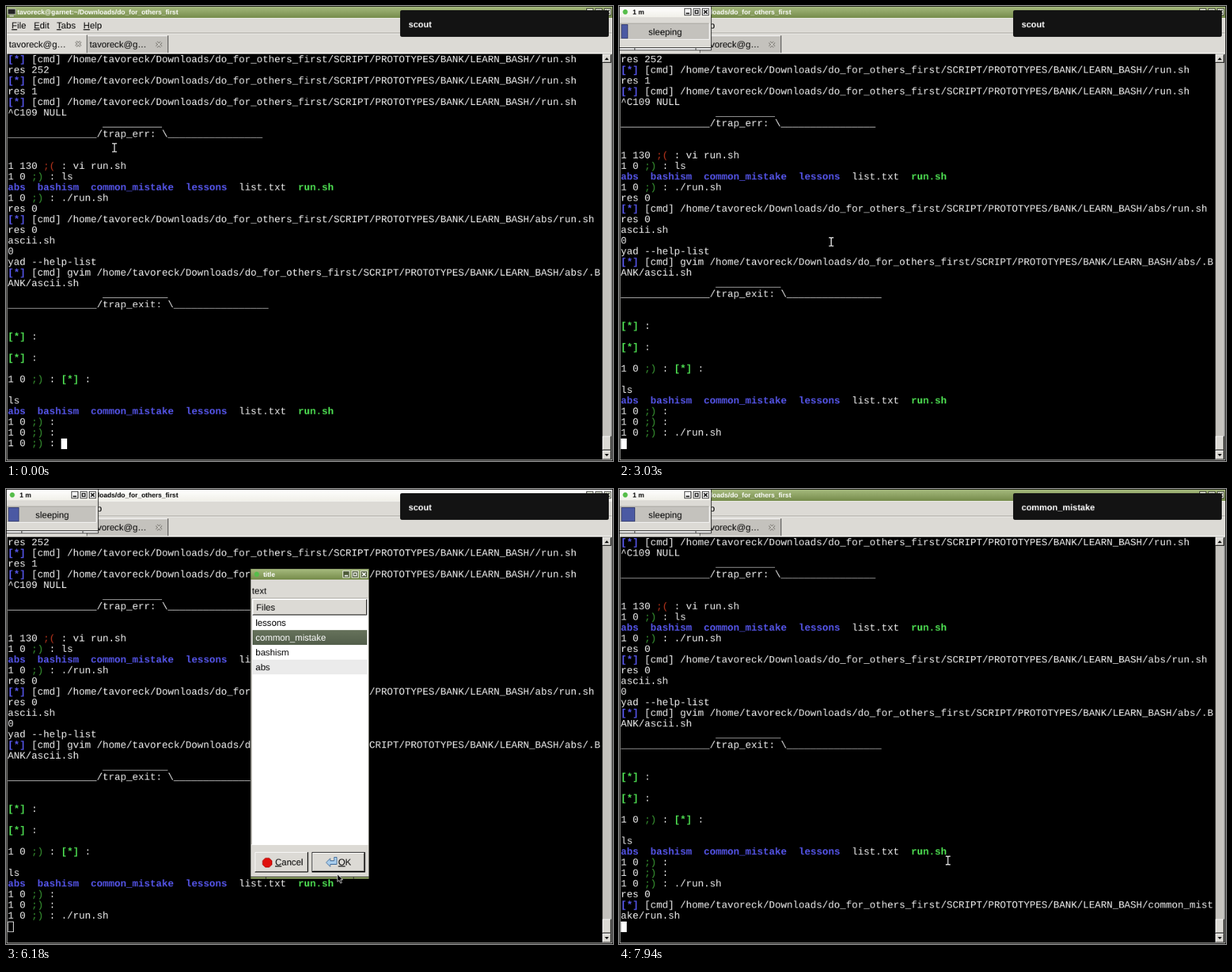
An HTML page for the animation above (8 s loop, 864 by 648 pixels).

```html
<!DOCTYPE html>
<html lang="en">
<head>
<meta charset="utf-8">
<title>Terminal session</title>
<style>
html, body { margin: 0; width: 100%; height: 100%; overflow: hidden; background: #000; }
/* A 1024 x 768 desktop, shown at 27/32 of its size */
svg { position: absolute; left: 0; top: 0; width: 1024px; height: 768px; transform: scale(.84375); transform-origin: 0 0; will-change: transform; }
text { font: 15.17px "Liberation Sans", Arial, sans-serif; fill: #000; white-space: pre; text-rendering: geometricPrecision; }
.cap { font-size: 11.25px; font-weight: bold; }
.note { font-size: 14.65px; font-weight: bold; fill: #fff; }
.term text { font: 16.665px "Liberation Mono", monospace; fill: #f4f4f4; }
.term .b { fill: #5656ec; font-weight: bold; }
.term .g { fill: #4ee052; font-weight: bold; }
.term .s { fill: #3a9c34; }
.term .r { fill: #b8341c; }
.u { text-decoration: underline; }
</style>
</head>
<body>
<svg id="stage" viewBox="0 0 1024 768">
  <defs>
    <linearGradient id="green" x2="0" y2="1"><stop stop-color="#a6ba7e"/><stop offset="1" stop-color="#758b4a"/></linearGradient>
    <linearGradient id="pale" x2="0" y2="1"><stop stop-color="#fff"/><stop offset="1" stop-color="#f1f0e9"/></linearGradient>
    <linearGradient id="sel" x2="0" y2="1"><stop stop-color="#66725b"/><stop offset="1" stop-color="#525e4a"/></linearGradient>
  </defs>
</svg>
<script>
const LOOP = 8000, SCALE = .84375, ROWS = 37, PITCH = 18, CELL = 10, LEFT = 3, TOP = 82;
const GREY = '#dcdad5', TROUGH = '#c4c2bd', SHADE = '#9c9a94', GREEN = 'url(#green)', PALE = 'url(#pale)';
const USER = 'tavoreck', HOST = 'garnet';
const stage = document.getElementById('stage');
const $ = id => document.getElementById(id);

const rect = (x, y, w, h, fill, more = '') =>
  `<rect x="${x}" y="${y}" width="${w}" height="${h}" fill="${fill}" ${more}/>`;
const box = (x, y, w, h, fill, line = '#000', more = '') =>
  rect(x + .5, y + .5, w - 1, h - 1, fill, `stroke="${line}" ${more}`);
const text = (x, y, s, more = '') => `<text x="${x}" y="${y}" ${more}>${s}</text>`;
const path = (d, line, w = 1, more = '') =>
  `<path d="${d}" fill="none" stroke="${line}" stroke-width="${w}" ${more}/>`;
const group = (id, ...parts) => `<g id="${id}">${parts.join('')}</g>`;
const dot = (x, y) => `<circle cx="${x}" cy="${y}" r="4.2" fill="#55bd4a"/>`;

// Two-tone edges: light above and left, dark below and right, or the reverse
const edges = (x, y, w, h, light, dark) =>
  path(`M${x + .5} ${y + h}V${y + .5}H${x + w}`, light) +
  path(`M${x} ${y + h - .5}H${x + w - .5}V${y}`, dark);
const raised = (x, y, w, h, more) => rect(x, y, w, h, GREY, more) +
  edges(x + 1, y + 1, w - 2, h - 2, GREY, SHADE).replace(`stroke="${GREY}"`, 'stroke="none"') +
  edges(x, y, w, h, '#fff', '#111');
const sunken = (x, y, w, h, fill) => rect(x, y, w, h, fill) + edges(x, y, w, h, SHADE, '#fff');

// Minimise, maximise and close, centred on the given x positions
const winButtons = (xs, y, fill, ink) => xs.map(x => box(x - 6, y - 6, 12, 12, fill, ink)).join('') +
  path(`M${xs[0] - 3} ${y + 2.5}h6`, ink, 2) +
  path(`M${xs[1] - 2.5} ${y - 2.5}h5v5h-5z`, ink, 1.6) +
  path(`M${xs[2] - 3} ${y - 3}l6 6m0 -6l-6 6`, ink, 1.8);
const closeMark = (x, y) => [['#77756f', 4.4], ['#d6d4cf', 1.8]]
  .map(([line, w]) => path(`M${x - 4} ${y - 4}l8 8m0 -8l-8 8`, line, w)).join('');
const handle = (x, y, w, fill) => rect(x, y, w, 4, fill) +
  path(`M${x} ${y + .5}h${w}M${x + 25.5} ${y}v4M${x + w - 25.5} ${y}v4`, '#222');

const menu = [[9.5, 'File'], [47, 'Edit'], [85.5, 'Tabs'], [130.5, 'Help']]
  .map(([x, s]) => text(x, 38, `<tspan class="u">${s[0]}</tspan>${s.slice(1)}`)).join('');
const tabName = `${USER}@${HOST[0]}…`;

const mainWindow = [
  rect(0, 0, 1024, 768, '#000'),
  rect(1, 1, 1022, 19, GREEN, 'id="bar"'),
  rect(3, 5, 13, 9, '#222', 'stroke="#ccc"') + rect(6, 16, 7, 2, '#ccc'),
  text(290.4, 14, `${USER}@${HOST}:~/Downloads/do_for_others_first`, 'class="cap" id="barText" text-anchor="end"'),
  winButtons([985, 1000, 1015], 10, '#dfe4d2', '#222'),
  rect(1, 20, 1022, 61, GREY),
  path('M1 20.5H1023M1 46.5H1023', '#f6f5f3') + path('M1 45.5H1023', SHADE),
  menu,
  rect(138, 50, 136, 29, TROUGH),
  path('M1 48.5H136M138 50.5H272', '#fff') + path('M136.5 49V79M273.5 50V79', '#222'),
  text(5, 69.5, tabName), closeMark(122, 64),
  text(141, 70, tabName), closeMark(258, 65),
  path('M138 79.5H1023', '#fff'),
  rect(2, 81, 1004, 685, '#000'),
  sunken(1006, 81, 15, 685, TROUGH),
  raised(1006, 82, 15, 14), raised(1006, 726, 15, 24), raised(1006, 750, 15, 16),
  '<path d="M1010 91l3.500 -4l3.500 4zM1010 756l3.500 4l3.500 -4z"/>',
  path('M1.5 20V766.5H1022.5V20', '#e9e8e4')
].join('');

const timerWindow = group('timer',
  rect(0, 0, 156, 75, '#000'),
  rect(1, 1, 154, 18, PALE, 'id="timerBar"'), dot(10.5, 10),
  text(23, 14, '1 m', 'class="cap" id="timerText"'),
  winButtons([116, 131, 146], 10, '#f4f4f4', '#111'),
  rect(1, 19, 154, 51, GREY),
  sunken(2, 29, 151, 28, TROUGH),
  box(4, 31, 3, 24, '#4b59a3', '#272f63', 'id="fill"'),
  text(78, 48.5, 'sleeping', 'text-anchor="middle"'),
  handle(1, 70, 154, '#fff'));

const files = ['lessons', 'common_mistake', 'bashism', 'abs'];
const dialog = group('dialog',
  rect(412, 134, 201, 524, '#1c1f16'),
  rect(413, 135, 199, 18, GREEN), dot(423, 144),
  text(434, 148, 'title', 'class="cap" style="fill:#fff"'),
  winButtons([574, 589, 604], 144, '#4e5b39', '#fff'),
  rect(413, 153, 199, 501, GREY),
  text(415, 177, 'text'),
  sunken(414, 184, 197, 417, '#fff'),
  raised(416, 186, 193, 27),
  text(422, 205, 'Files'),
  files.map((name, i) =>
    rect(416, 213 + i * 25, 193, 25, i % 2 ? '#ebebeb' : '#fff', `id="row${i}"`) +
    text(421, 231 + i * 25, name, `id="name${i}"`)).join(''),
  raised(420, 613, 90, 34),
  '<path d="M437.500 623h6.500l4.500 4.500v6.500l-4.500 4.500h-6.500l-4.500 -4.500v-6.500z" fill="#e0100c" stroke="#a80a08"/>',
  text(454, 635, '<tspan class="u">C</tspan>ancel'),
  box(516, 613, 90, 34, '#111'),
  raised(517, 614, 88, 32, 'id="ok"'),
  '<path d="M540 630.500l7 -7v4h6.500v-6h4.500v12h-11v4z" fill="#a9cdec" stroke="#2c5a8c"/>',
  text(560.5, 635, '<tspan class="u">O</tspan>K'),
  handle(413, 654, 199, '#8da262'));

const note = rect(665, 7, 352, 45, '#131313', 'rx="3"') + text(679, 35.5, '', 'class="note" id="note"');
const beam = 'M-4 -7h3l1 1l1 -1h3M0 -6V6M-4 7h3l1 -1l1 1h3';
const pointer = group('beam', path(beam, '#000', 3.6) + path(beam, '#fff', 1.5)) +
  group('arrow', '<path d="M0 0V13l3 -2.600l2.400 5l2.200 -1l-2.400 -4.800h4z" fill="#000" stroke="#fff" stroke-width=".9"/>');

// Terminal contents
const tag = (c, s) => `<tspan class="${c}">${s}</tspan>`;
const dir = `/home/${USER}/Downloads/do_for_others_first/SCRIPT/PROTOTYPES/BANK/LEARN_BASH/`;
const cmd = s => `${tag('b', '[*]')} [cmd] ${s}`;
const prompt = `1 0 ${tag('s', ';)')} : `;
const star = tag('g', '[*]') + ' :';
const listing = ['abs', 'bashism', 'common_mistake', 'lessons'].map(s => tag('b', s)).join('  ') +
  '  list.txt  ' + tag('g', 'run.sh');
const trap = name => [' '.repeat(16) + '_'.repeat(name.length + 2),
  '_'.repeat(15) + `/${name}: \\` + '_'.repeat(16), '', ''];
const history = [
  cmd(dir + '/run.sh'), 'res 252', cmd(dir + '/run.sh'), 'res 1', cmd(dir + '/run.sh'), '^C109 NULL',
  ...trap('trap_err'),
  `1 130 ${tag('r', ';(')} : vi run.sh`, prompt + 'ls', listing, prompt + './run.sh', 'res 0',
  cmd(dir + 'abs/run.sh'), 'res 0', 'ascii.sh', '0', 'yad --help-list',
  cmd(`gvim ${dir}abs/.B`), 'ANK/ascii.sh',
  ...trap('trap_exit'),
  star, '', star, '', prompt + star, '', 'ls', listing, prompt, prompt
];
const typing = [[0, ''], [1700, '.'], [1760, './'], [2210, './r'], [2410, './ru'], [2610, './run.sh ']];
const output = [[3030], [7740, 'res 0'], [7820, cmd(dir + 'common_mist'), 'ake/run.sh']];

stage.insertAdjacentHTML('beforeend', mainWindow +
  `<g class="term"><g id="lines"></g><rect id="caret"/></g>` +
  timerWindow + dialog + note + `<g id="pointer">${pointer}</g>`);

const ticks = [790, 1800, 2770, 3760, 4760, 5750, 6740, 7670];
// Time and pointer position in stage pixels
const track = [
  [0, 154, 202], [50, 154, 202], [640, 302, 336], [4160, 302, 336], [4840, 450, 212], [5220, 450, 212],
  [5450, 467, 381], [6050, 470, 536], [6300, 472, 549], [6600, 472, 549], [6860, 421, 381],
  [6960, 415, 362], [7380, 468, 529], [8000, 468, 529]
];

// Smooth path through the track, at rest wherever a point repeats
function slope(i, k) {
  const [a, b, c] = [track[i - 1], track[i], track[i + 1]];
  const same = (p, q) => p[1] === q[1] && p[2] === q[2];
  return !a || !c || same(a, b) || same(b, c) ? 0 : (c[k] - a[k]) / (c[0] - a[0]);
}
function pointerAt(t) {
  const i = track.findLastIndex(p => p[0] <= t), a = track[i], b = track[i + 1];
  const d = b[0] - a[0], u = (t - a[0]) / d, v = 1 - u;
  return [1, 2].map(k => Math.round((v * v * (1 + 2 * u) * a[k] + u * u * (3 - 2 * u) * b[k] +
    d * u * v * (v * slope(i, k) - u * slope(i + 1, k))) / SCALE));
}

const set = (id, attrs) => { for (const k in attrs) $(id).setAttribute(k, attrs[k]); };
const show = (id, on) => { $(id).style.display = on ? '' : 'none'; };
const during = (t, a, b) => t >= a && t < b;
let shown = '';

function drawTerminal(t) {
  const typed = typing.findLast(s => s[0] <= t)[1];
  const lines = [...history, prompt + typed];
  for (const [at, ...more] of output) if (t >= at) lines.push(...more);
  const entered = t >= output[0][0];
  if (entered) lines.push('');
  const html = lines.slice(-ROWS).map((s, i) => text(LEFT, TOP + 13 + i * PITCH, s)).join('');
  if (html !== shown) $('lines').innerHTML = shown = html;

  const hollow = during(t, 50, 650) || during(t, 3180, 7720);
  const x = LEFT + (entered ? 0 : 9 + typed.length) * CELL, y = TOP + (ROWS - 1) * PITCH;
  set('caret', hollow
    ? { x: x + .5, y: y + .5, width: CELL - 1, height: PITCH - 1, fill: 'none', stroke: '#fff' }
    : { x, y, width: CELL, height: PITCH, fill: '#fff', stroke: 'none' });
}

function draw(t) {
  drawTerminal(t);

  const timerFocus = during(t, 50, 650);
  const away = timerFocus || during(t, 3180, 7600);
  set('bar', { fill: away ? PALE : GREEN });
  $('barText').style.fill = away ? '#000' : '#fff';

  show('timer', t >= 50);
  set('timerBar', { fill: timerFocus ? GREEN : PALE });
  $('timerText').style.fill = timerFocus ? '#fff' : '#000';
  const seconds = 1 + ticks.filter(s => s <= t).length;
  set('fill', { width: Math.round(seconds * 147 / 60) });

  const open = during(t, 3180, 7600), picked = t >= 4840;
  const [x, y] = pointerAt(t);
  show('dialog', open);
  set('row1', { fill: picked ? 'url(#sel)' : '#ebebeb' });
  $('name1').style.fill = picked ? '#fff' : '#000';
  const over = x > 516 && x < 606 && y > 613 && y < 647;
  set('ok', { fill: t >= 7520 ? TROUGH : over ? '#eeebe7' : GREY });

  const arrow = open && x > 412 && x < 613 && y > 134 && y < 658;
  show('arrow', arrow);
  show('beam', !arrow);
  set('pointer', { transform: `translate(${x} ${y})` });

  $('note').textContent = t < 7900 ? 'scout' : 'common_mistake';
}

const start = performance.now();
function tick() {
  draw((performance.now() - start) % LOOP);
  requestAnimationFrame(tick);
}
tick();
</script>
</body>
</html>
```
